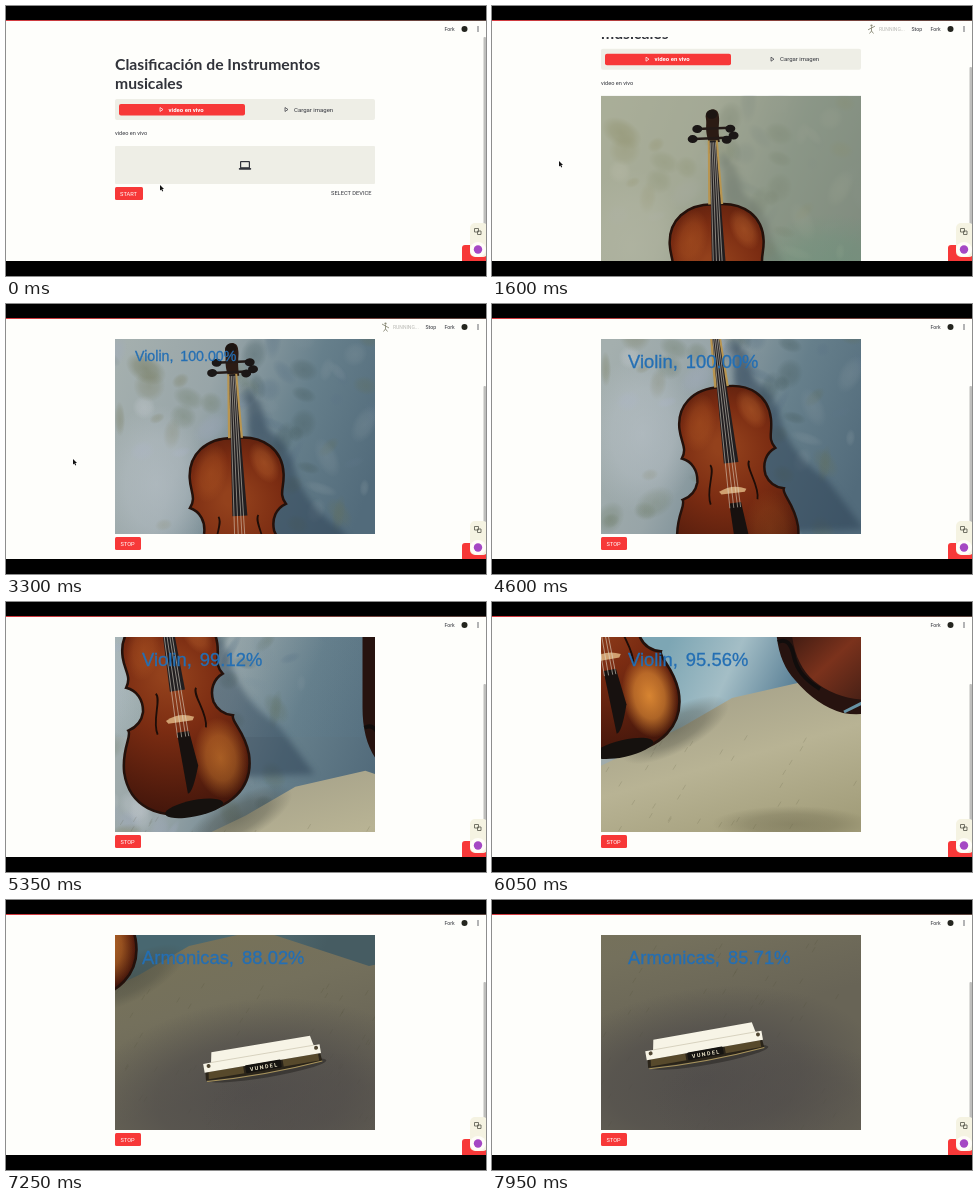
These frames come from a looping animation (480 px wide and 270 px high, 8 s). An HTML page with a canvas:

```html
<!DOCTYPE html>
<html lang="es">
<head>
<meta charset="utf-8">
<title>Clasificación de Instrumentos musicales</title>
<style>
html, body { margin: 0; width: 100%; height: 100%; overflow: hidden; background: #000; }
canvas { display: block; width: 480px; height: 270px; }
</style>
</head>
<body>
<canvas id="stage" width="480" height="270"></canvas>
<script>
const ctx = document.getElementById('stage').getContext('2d');
const LOOP = 8000, TAU = Math.PI * 2;
const PAGE = '#fefefb', PANEL = '#eeeee6', RED = '#f73838', INK = '#31333a';
const UI = 'Roboto, sans-serif';

// ---------- helpers ----------
const lerp = (a, b, k) => a + (b - a) * k;

// Smoothly interpolates rows of [time, ...values].
function track(t, rows) {
  if (t <= rows[0][0]) return rows[0].slice(1);
  for (let i = 1; i < rows.length; i++) {
    const [a, b] = [rows[i - 1], rows[i]];
    if (t < b[0]) {
      const k = (t - a[0]) / (b[0] - a[0]), e = k * k * (3 - 2 * k);
      return a.slice(1).map((v, j) => lerp(v, b[j + 1], e));
    }
  }
  return rows[rows.length - 1].slice(1);
}
function seeded(seed) {
  return () => (seed = (seed * 16807) % 2147483647) / 2147483647;
}
function box(x, y, w, h, color, r = 0) {
  ctx.fillStyle = color;
  ctx.beginPath();
  ctx.roundRect(x, y, w, h, r);
  ctx.fill();
}
function oval(x, y, rx, ry, color, angle = 0) {
  ctx.fillStyle = color;
  ctx.beginPath();
  ctx.ellipse(x, y, rx, ry, angle, 0, TAU);
  ctx.fill();
}
function shape(path, color) {
  ctx.fillStyle = color;
  ctx.fill(new Path2D(path));
}
function line(path, color, width = 1) {
  ctx.strokeStyle = color;
  ctx.lineWidth = width;
  ctx.stroke(new Path2D(path));
}
function text(str, x, y, size, color, weight = 400, family = UI) {
  ctx.font = `${weight} ${size}px ${family}`;
  ctx.fillStyle = color;
  ctx.fillText(str, x, y);
}
function placed(x, y, degrees, scale, draw) {
  ctx.save();
  ctx.translate(x, y);
  ctx.rotate(degrees * Math.PI / 180);
  ctx.scale(scale, scale);
  draw();
  ctx.restore();
}
function ramp(x0, y0, x1, y1, ...colors) {
  const g = ctx.createLinearGradient(x0, y0, x1, y1);
  colors.forEach((c, i) => g.addColorStop(i / (colors.length - 1), c));
  return g;
}
// Soft spot; rgb is "r,g,b".
function glow(x, y, rx, ry, rgb, alpha, degrees = 0) {
  placed(x, y, degrees, 1, () => {
    ctx.scale(rx, ry);
    const g = ctx.createRadialGradient(0, 0, 0, 0, 0, 1);
    g.addColorStop(0, `rgba(${rgb},${alpha})`);
    g.addColorStop(.55, `rgba(${rgb},${alpha * .7})`);
    g.addColorStop(1, `rgba(${rgb},0)`);
    oval(0, 0, 1, 1, g);
  });
}

// ---------- camera picture ----------
const BODY = 'M0 0C30-2 47 15 47 38C47 52 41 58 48 68C38 72 33 82 35 94C38 104 44 108 52 110' +
  'C49 116 61 126 62 150C62 185 35 200 0 200C-35 200-62 185-62 150C-61 126-49 116-52 110' +
  'C-44 108-38 104-35 94C-33 82-38 72-48 68C-41 58-47 52-47 38C-47 15-30-2 0 0Z';

function violin(light) {
  const wood = ctx.createRadialGradient(-6, 60, 8, 0, 85, 125);
  wood.addColorStop(0, '#93411c');
  wood.addColorStop(.35, '#7b2c12');
  wood.addColorStop(1, '#3c130a');
  shape(BODY, wood);
  line(BODY, '#24110b', 2.5);
  glow(-26, 34, 17, 30, '176,88,36', .5, 15);
  glow(28, 26, 13, 22, '190,104,48', .5, -25);
  glow(34, 150, 26, 40, '236,150,56', light);
  for (const side of [-1, 1]) {
    ctx.save();
    ctx.scale(side, 1);
    line('M20 78C15 84 28 104 24 118', '#1d0d08', 1.8);
    ctx.restore();
  }
  // scroll, pegs and neck
  shape('M-4-62C-8-75-5-80-6-86C-8-96 7-99 7-88C8-82 5-76 7-62Z', '#2b1b14');
  oval(0, -90, 5.5, 4.5, '#1c1512');
  line('M-16-76H18M-20-66H20', '#231a17', 2.5);
  for (const [x, y] of [[-15, -76], [18, -75], [-20, -66], [21, -68], [14, -64]]) {
    oval(x, y, 5, 4, '#1b1716');
  }
  shape('M-5-64H5L8 0H-7Z', '#b89550');
  shape('M-3-64H3L9 78H-6Z', '#211e20');
  // tailpiece, bridge and chin rest
  shape('M-5 119H7L11 154Q2 180-3 180Z', '#17110f');
  shape('M-14 106Q0 99 14 106L12 109H-12Z', '#d0a070');
  oval(1, 195, 29, 8, '#15110e', -.05);
  line('M-2.5-62L-5 124M-.8-62L-1 124M.8-62L3 124M2.5-62L6 124', 'rgba(225,220,205,.75)', .7);
}

function wall(t) {
  box(109, 35, 260, 195, ramp(109, 70, 369, 170, '#a4afae', '#98a5a8', '#667f8b', '#526b7b'));
  const [dx, dy, haze] = track(t, [[1300, -10, 8, .5], [2350, -12, 5, .5], [3300, 0, 0, 0],
    [4600, 0, -50, 0], [6050, -120, -150, 0]]);
  const rnd = seeded(71);
  const lit = ['196,202,208', '114,128,110', '160,170,190', '126,130,104'];
  const shaded = ['122,142,152', '74,96,100', '92,116,134', '96,112,100'];
  for (let i = 0; i < 110; i++) {
    const x = 95 + rnd() * 290, y = 30 + rnd() * 330;
    glow(x + dx, y + dy, 5 + rnd() * 17, 4 + rnd() * 12, (x < 235 ? lit : shaded)[i % 4],
      .42, rnd() * 180);
  }
  glow(150 + dx, 180 + dy, 55, 80, '192,200,208', .5);
  glow(140 + dx, 65 + dy, 22, 14, '108,112,78', .5, 30);
  // cast shadow
  ctx.save();
  ctx.filter = 'blur(3px)';
  ctx.translate(dx, dy);
  shape('M240 85L254 98L262 126Q284 138 290 170Q304 206 335 225L372 275L250 280Z',
    'rgba(42,62,82,.5)');
  ctx.restore();
  if (haze) {
    box(109, 35, 260, 195, `rgba(176,174,132,${haze})`);
    glow(340, 215, 90, 62, '84,150,118', haze * .6);
  }
}

function carpet(t) {
  const [dx, dy] = track(t, [[4600, 100, 220], [5300, 50, 90], [6050, 0, 0],
    [7250, -57, -50], [7950, -150, -90]]);
  const [dark] = track(t, [[6050, 0], [7250, 1]]);
  const tone = (a, b) => `rgb(${a.map((v, i) => Math.round(lerp(v, b[i], dark)))})`;
  // bluish backdrop beyond the far edge
  if (t > 5300) {
    ctx.globalAlpha = Math.min(1, (t - 5300) / 500);
    box(109, 35, 260, 100, ramp(180, 35, 300, 90, tone([125, 166, 180], [72, 103, 112]),
      tone([164, 190, 198], [82, 108, 112]), tone([90, 128, 150], [70, 92, 98])));
    ctx.globalAlpha = 1;
  }
  ctx.save();
  ctx.translate(dx, dy);
  shape('M-80 230L100 168L190 125L240 96L310 80L420 116L680 60V540H-80Z',
    ramp(200, 75, 250, 250, tone([163, 159, 136], [120, 115, 88]),
      tone([184, 179, 148], [116, 112, 92]), tone([162, 157, 122], [104, 100, 86])));
  const rnd = seeded(19);
  ctx.beginPath();
  for (let i = 0; i < 170; i++) {
    const x = 60 + rnd() * 440, y = 130 + rnd() * 250;
    ctx.moveTo(x, y);
    ctx.lineTo(x + 3, y - 5);
  }
  ctx.strokeStyle = 'rgba(70,66,45,.15)';
  ctx.lineWidth = 1;
  ctx.stroke();
  glow(183, 128, 60, 22, '70,72,62', .5, -28);
  glow(300, 222, 80, 18, '95,91,66', .4 * (1 - dark));
  ctx.restore();
  if (dark) {
    const [sx, sy] = track(t, [[6050, 390, 275], [7250, 245, 192], [7950, 212, 180]]);
    glow(sx, sy, 175, 92, '78,75,74', .85 * dark, -8);
    glow(sx + 80, sy + 25, 130, 65, '80,76,74', .55 * dark);
  }
}

function secondViolin(t) {
  const [dx, dy] = track(t, [[4900, 110, 130], [6050, 0, 0], [7000, 70, -110]]);
  ctx.save();
  ctx.translate(dx, dy);
  shape('M284-80V20Q284 58 303 78Q325 104 351 111Q380 116 400 100V-80Z', '#27130f');
  shape('M299-80V20Q300 60 322 79Q345 98 380 98V-80Z',
    ramp(300, 30, 365, 100, '#3f1b12', '#7b321c', '#4a2116'));
  line('M286 40Q298 34 302 55Q306 74 328 87', '#110d0c', 4);
  line('M352 110L374 99', '#6793a5', 3);
  ctx.restore();
}

function harmonica() {
  oval(3, 13, 60, 7, 'rgba(30,28,25,.45)');
  shape('M-58 3L58 3L59 13Q0 17-59 13Z', '#2a2419');
  shape('M-55 5H-20V12H-56ZM20 5H56V12H20Z', '#57492b');
  line('M-58 14Q0 18 59 13', '#a8935b', 1);
  shape('M-49-14H51L53-4H59V5H-59V-4H-51Z', '#f7f4e6');
  line('M-51-4H53', '#d2ccb8', .8);
  oval(-54, -1, 2, 2, '#504632');
  oval(55, -1, 2, 2, '#504632');
  box(-18, 4.5, 36, 8, '#151310', 1);
  ctx.textAlign = 'center';
  text('V U N D E L', 0, 11, 5.5, '#e8e1c6', 700);
  ctx.textAlign = 'left';
}

function caption(t) {
  if (t < 2750) return;
  const small = t < 3600;
  const score = t < 5300 ? 'Violin, 100.00%' : t < 5700 ? 'Violin, 99.12%' :
    t < 6400 ? 'Violin, 95.56%' : t < 6800 ? 'Armonicas, 71.35%' :
    t < 7500 ? 'Armonicas, 88.02%' : 'Armonicas, 85.71%';
  const x = small ? 129 : 136, y = small ? 56.5 : 63.5, color = '#246fb4';
  ctx.wordSpacing = '3px';
  text(score, x, y, small ? 14.2 : 18.4, color, 400, '"Liberation Sans", sans-serif');
  ctx.strokeStyle = color;
  ctx.lineWidth = .3;
  ctx.strokeText(score, x, y);
  ctx.wordSpacing = '0px';
}

function camera(t) {
  ctx.save();
  ctx.beginPath();
  ctx.rect(109, 35, 260, 195);
  ctx.clip();
  wall(t);
  if (t > 4600) carpet(t);
  if (t > 4900 && t < 7000) secondViolin(t);
  const [x, y, angle, scale, light] = track(t, [[1300, 225, 145, -2, 1, .1],
    [2350, 216, 138, -3, 1, .1], [3300, 229, 134, -2.5, 1, .1], [4600, 229, 83, -6.5, .98, .15],
    [6050, 95, -55, -10, 1.05, .85], [7250, 38, -105, -10, 1.05, .6],
    [7800, -40, -150, -10, 1.05, .6]]);
  placed(x, y, angle, scale, () => violin(light));
  if (t > 6050) {
    const [hx, hy, tilt] = track(t, [[6050, 440, 290, -5], [6650, 330, 205, -7],
      [7250, 256, 158, -9.6], [7950, 212, 145, -10]]);
    placed(hx, hy, tilt, 1, harmonica);
  }
  caption(t);
  ctx.restore();
}

// ---------- page ----------
function playIcon(x, y, color) {
  line(`M${x} ${y - 2}L${x + 3} ${y}L${x} ${y + 2}Z`, color, .7);
}

function page(t) {
  const live = t >= 1200, started = t >= 650;
  const [scroll] = track(t, [[1350, 0], [1850, 100], [2450, 100], [2650, 105]]);
  const [alpha] = track(t, [[1850, 1], [2050, .42], [2450, .42], [2650, 1]]);
  ctx.save();
  ctx.translate(0, -scroll);
  text('Clasificación de Instrumentos', 109, 64, 15.7, INK, 700, 'Lato, sans-serif');
  text('musicales', 109, 83, 15.7, INK, 700, 'Lato, sans-serif');
  box(109, 93, 260, 21, PANEL, 2);
  box(113, 98, 126, 11.5, RED, 2);
  playIcon(154, 103.5, '#fff');
  text('video en vivo', 162.5, 105.5, 6, '#fff', 700);
  playIcon(279, 103.5, INK);
  text('Cargar imagen', 288, 105.5, 6, INK);
  text('video en vivo', 109, 129, 5.6, INK);

  ctx.globalAlpha = alpha;
  const bottom = live ? 335 : 178;
  if (live) {
    // Fading is done with a veil so overlapping parts stay opaque to each other.
    ctx.save();
    ctx.globalAlpha = 1;
    ctx.translate(0, 105);
    camera(t);
    ctx.globalAlpha = 1 - alpha;
    box(109, 35, 260, 195, PAGE);
    ctx.restore();
  } else {
    box(109, 140, 260, 38, PANEL, 1);
    if (started) {
      const a = t / 120;
      ctx.beginPath();
      ctx.arc(239, 159, 6, a, a + 4.5);
      ctx.strokeStyle = RED;
      ctx.lineWidth = 1.4;
      ctx.stroke();
    } else {
      box(234, 155, 10, 7.5, INK, 1);
      box(235.2, 156.2, 7.6, 5, PANEL);
      box(232.8, 162, 12.4, 1.8, INK, .8);
    }
  }
  box(109, bottom + 3, started ? 26 : 28, 13, RED, 1.5);
  text(started ? 'STOP' : 'START', started ? 114.5 : 114, bottom + 11.6, 5.7, '#fff');
  if (!started) text('SELECT DEVICE', 325, bottom + 11.2, 5.7, INK);
  ctx.restore();
}

function header(t) {
  box(0, 14, 480, 17, PAGE);
  if (t >= 800 && t < 4150) {
    const swing = Math.sin(t / 110) * 2;
    line(`M379.5 21V25L377.5 27.5M379.5 25L381.5 27.5M376 ${22 + swing}L379.5 22L383 ${22 - swing}`,
      '#8b8b78', .9);
    oval(379.5, 19.6, 1.1, 1.1, '#8b8b78');
    text('RUNNING...', 387, 25, 5, '#b9b9b4');
    text('Stop', 419.5, 25, 5.2, INK);
  }
  text('Fork', 438.5, 25, 5.2, INK);
  oval(458.5, 23, 3, 3, '#24251f');
  for (const y of [21, 23, 25]) oval(472, y, .7, .7, INK);
}

function corner(t) {
  const [top, bottom] = track(t, [[1250, 31, 235], [1850, 79, 236], [2650, 82, 223]]);
  box(477.5, top, 2.5, bottom - top, '#bebebc', 1);
  box(456, 239, 24, 18, RED, 3);
  box(464, 217, 18, 34, '#f5f3e2', 5);
  line('M468.5 222.5H472.5V226H468.5ZM471.5 225H475V228.5H471.5Z', '#66665a', .9);
  oval(472, 243.5, 8, 7.5, '#fffdf8');
  oval(472, 243.5, 4.2, 4.2, '#a548c4');
}

function pointer(t) {
  if (t > 3900) return;
  const [x, y] = track(t, [[150, 154, 179], [550, 124, 187], [950, 124, 187],
    [1600, 67, 155], [3550, 67, 155], [3900, 4, 165]]);
  ctx.save();
  ctx.translate(x, y);
  const arrow = 'M0 0V5.6L1.3 4.4L2.3 6.5L3.2 6L2.3 4H4Z';
  line(arrow, '#fff', 1);
  shape(arrow, '#111');
  ctx.restore();
}

function frame(t) {
  box(0, 0, 480, 270, '#000');
  ctx.save();
  ctx.beginPath();
  ctx.rect(0, 14, 480, 241);
  ctx.clip();
  box(0, 14, 480, 241, PAGE);
  page(t);
  header(t);
  corner(t);
  pointer(t);
  ctx.restore();
  box(0, 14, 480, 1, ramp(0, 0, 480, 0, '#d63a40', '#93403a', '#5c4640'));
}

const start = performance.now();
function tick() {
  frame((performance.now() - start) % LOOP);
  requestAnimationFrame(tick);
}
tick();
</script>
</body>
</html>
```
